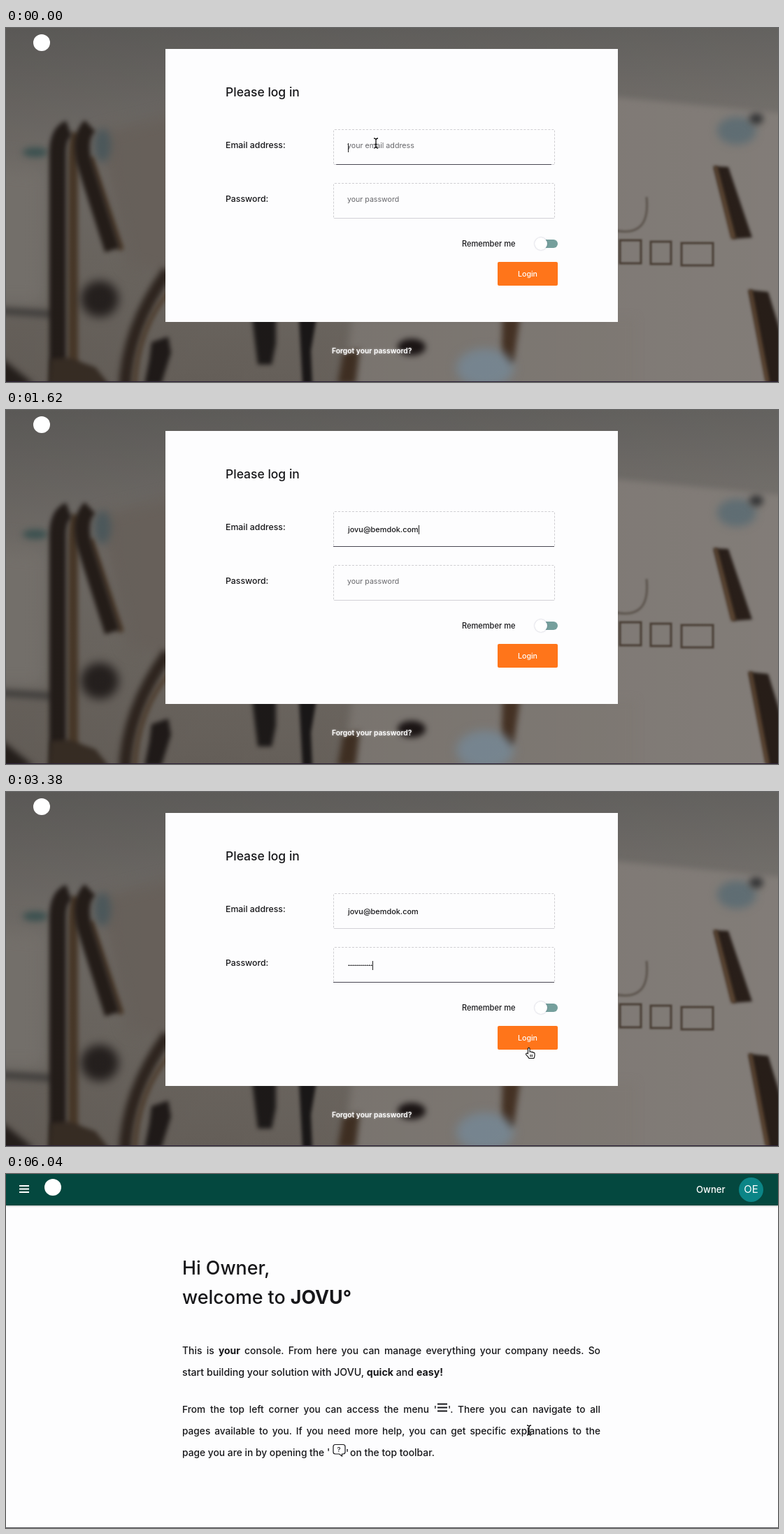
Write an HTML page with a canvas that moves like this. It is 1104x507 px and loops after 6060 ms.

```html
<!DOCTYPE html>
<html lang="en">
<head>
<meta charset="utf-8">
<title>Login</title>
<style>
html, body { margin: 0; width: 100%; height: 100%; overflow: hidden; background: #fdfdfe; }
body { position: relative; font-family: Inter, "Open Sans", sans-serif; font-weight: 500; color: #17171a; }
section, canvas { position: absolute; left: 0; top: 0; width: 1104px; height: 507px; overflow: hidden; }
p, .box { position: absolute; margin: 0; left: calc(var(--x) * 1px); top: calc(var(--y) * 1px); }
p { font-size: calc(var(--s) * 1px); line-height: 0; white-space: nowrap; }
.box { box-sizing: border-box; width: calc(var(--w) * 1px); height: calc(var(--h) * 1px); }
.white { color: #fff; }
.just { width: 598px; text-align: justify; text-align-last: justify; }
b { font-weight: 700; }
.card { background: #fdfdfe; }
.field { border: 1px dashed #cfced2; border-bottom: 1px solid #d2d1d6; border-radius: 2px; }
.line { background: #484652; }
.hint { color: #66666a; font-weight: 400; }
.value { display: flex; align-items: center; height: 0; }
.caret { width: 1px; height: 13px; background: #222; }
#dots { height: 2.92px; background: radial-gradient(circle, #17171a .75px, transparent 1.3px) 0 0 / 2.92px 2.92px; }
.knob { background: #fff; border-radius: 50%; box-shadow: 0 0 2px rgba(40,40,90,.35); }
.round { border-radius: 50%; background: #fff; }
svg { overflow: visible; }
p svg { display: inline-block; vertical-align: baseline; }
.cursor { position: absolute; left: 0; top: 0; width: 1px; height: 1px; }
</style>
</head>
<body>
<section id="login">
  <canvas id="photo" width="1104" height="507"></canvas>
  <div class="box round" style="--x:39;--y:9;--w:24;--h:24"></div>
  <div class="box card" style="--x:228;--y:30;--w:647;--h:391"></div>
  <p style="--x:314;--y:91.5;--s:17.5">Please log in</p>
  <p style="--x:314;--y:168;--s:12.3">Email address:</p>
  <p style="--x:314;--y:245;--s:12.3">Password:</p>
  <div class="box field" style="--x:468;--y:145;--w:317;--h:51"></div>
  <div class="box field" style="--x:468;--y:222;--w:317;--h:51"></div>
  <div class="box line" id="mailLine" style="--x:468;--y:195;--w:316;--h:1"></div>
  <div class="box line" id="passLine" style="--x:468;--y:272;--w:316;--h:1"></div>
  <p class="hint" id="mailHint" style="--x:488;--y:168.5;--s:10.7">your email address</p>
  <p class="hint" id="passHint" style="--x:488;--y:245.5;--s:10.6">your password</p>
  <p class="value" style="--x:489;--y:171;--s:10.9"><span id="mail"></span><i class="caret" id="mailCaret"></i></p>
  <p class="value" style="--x:489;--y:248;--s:10.9"><span id="dots"></span><i class="caret" id="passCaret"></i></p>
  <p style="--x:652;--y:309;--s:11.05">Remember me</p>
  <div class="box" style="--x:757;--y:302.5;--w:32;--h:12;background:#759f9c;border-radius:6px"></div>
  <div class="box knob" style="--x:756;--y:300;--w:18;--h:18"></div>
  <div class="box" style="--x:703;--y:335;--w:86;--h:34;background:#ff751a;border-radius:2px"></div>
  <p class="white" style="--x:732;--y:352.5;--s:10.6">Login</p>
  <p class="white" style="--x:466;--y:461.5;--s:10.3;font-weight:600;text-shadow:0 0 3px #fff8">Forgot your password?</p>
  <div class="box" style="--x:0;--y:506;--w:1104;--h:1;background:#2d2238"></div>
</section>

<section id="home">
  <div class="box" style="--x:0;--y:0;--w:1104;--h:45;background:#04483f;box-shadow:0 1px 2px rgba(0,0,0,.3)"></div>
  <svg class="cursor"><path d="M19 17H33M19 21.5H33M19 26H33" stroke="#fff" stroke-width="2"/></svg>
  <div class="box round" style="--x:55;--y:7;--w:24;--h:24"></div>
  <p class="white" style="--x:987;--y:21.5;--s:13.1">Owner</p>
  <div class="box" style="--x:1048;--y:4.5;--w:35;--h:35;background:#0b8587;border-radius:50%"></div>
  <p class="white" style="--x:1048;--y:22;--s:15;width:35px;text-align:center;font-weight:400">OE</p>
  <p style="--x:252;--y:134;--s:26.8">Hi Owner,</p>
  <p style="--x:252;--y:176;--s:26.8">welcome to <b>JOVU°</b></p>
  <p class="just" style="--x:252;--y:252.5;--s:13.9">This is <b>your</b> console. From here you can manage everything your company needs. So</p>
  <p style="--x:252;--y:284;--s:14.2">start building your solution with JOVU, <b>quick</b> and <b>easy!</b></p>
  <p class="just" style="--x:252;--y:337;--s:13.7">From the top left corner you can access the menu '<svg width="16" height="1"><path d="M1 -11.5H15M1 -6.5H15M1 -1.5H15" stroke="#17171a" stroke-width="2"/></svg>'. There you can navigate to all</p>
  <p class="just" style="--x:252;--y:368;--s:13.7">pages available to you. If you need more help, you can get specific explanations to the</p>
  <p style="--x:252;--y:398.5;--s:13.8">page you are in by opening the '</p>
  <svg class="cursor"><path d="M471 387.5H482Q485 387.5 485 390.5V398Q485 401 482 401H480.5V404L476.5 401H471Q468 401 468 398V390.5Q468 387.5 471 387.5Z" fill="none" stroke="#17171a" stroke-width="1.2"/></svg>
  <p style="--x:473.6;--y:394.5;--s:9.5">?</p>
  <p style="--x:486;--y:398.5;--s:13.7">'</p>
  <p style="--x:492;--y:398.5;--s:13.9">on the top toolbar.</p>
  <div class="box" style="--x:0;--y:506;--w:1104;--h:1;background:#59595d"></div>
</section>

<svg class="cursor" id="cursor" fill="#fff" stroke="#111" stroke-linejoin="round">
  <path id="beam" fill="none" stroke-width="1.3" d="M-3 -7Q0 -7 0 -4.5Q0 -7 3 -7M0 -5V5M-3 7Q0 7 0 4.5Q0 7 3 7M-1.5 1.5H1.5"/>
  <path id="arrow" d="M0 0V13L3 10.2L5 14.8L7 14L5 9.5H9Z"/>
  <path id="hand" stroke-width="1.1" d="M-1.6 7.5V1Q-1.6 -.6 -.3 -.6Q1 -.6 1 1V5.2Q2.8 4 3.7 5.7Q5.4 4.7 6.2 6.4Q8 5.7 8 8V10.5Q8 12.4 6.8 14.5H0Q-1.5 11.8 -4 9.6Q-5 8 -3.6 7.2Q-2.6 6.7 -1.6 8Z M2 9V12.5M4.3 9V12.5"/>
</svg>

<script>
const LOOP = 6060, MAIL = 'jovu@bemdok.com', DOTS = 12;
const MAIL_START = 250, MAIL_STEP = 85, TAB = 1800, PASS_START = 2020, PASS_STEP = 65;
const MOVE = 3050, MOVE_TIME = 270, SWITCH = 3600;
const $ = id => document.getElementById(id);
const clamp = v => Math.max(0, Math.min(1, v));
const easeOut = v => 1 - (1 - v) ** 2;
const show = (id, on) => { $(id).style.display = on ? '' : 'none'; };

// Blurred workshop backdrop
function paintPhoto() {
  const c = $('photo').getContext('2d');
  const fade = (x, y, ...colors) => {
    const g = c.createLinearGradient(0, 0, x, y);
    colors.forEach((color, i) => g.addColorStop(i / (colors.length - 1), color));
    c.fillStyle = g;
    c.fillRect(0, 0, 1104, 507);
  };
  const soft = (blur, color) => { c.filter = `blur(${blur}px)`; c.fillStyle = c.strokeStyle = color; };
  const poly = (blur, color, ...pts) => {
    soft(blur, color);
    c.beginPath();
    for (let i = 0; i < pts.length; i += 2) c.lineTo(pts[i], pts[i + 1]);
    c.fill();
  };
  const oval = (blur, color, x, y, rx, ry) => {
    soft(blur, color);
    c.beginPath();
    c.ellipse(x, y, rx, ry, 0, 0, 7);
    c.fill();
  };
  const curve = (blur, color, width, d) => {
    soft(blur, color);
    c.lineWidth = width;
    c.stroke(new Path2D(d));
  };

  fade(0, 507, '#6c6a67', '#827d78', '#7c766f', '#756e67');
  poly(14, '#8a857f', -30, 190, 60, 200, 60, 400, -30, 400);
  poly(10, '#79716a', 130, 150, 250, 120, 250, 360, 175, 340);
  poly(4, '#8d8782', 860, 98, 1130, 124, 1130, 530, 860, 530);
  poly(6, '#8b857f', 495, 415, 900, 415, 900, 530, 480, 530);
  curve(5, '#4b4846', 10, 'M-10 405L70 410');

  // Left frame
  oval(5, '#46605f', 42, 178, 18, 7);
  oval(6, '#59676b', 138, 168, 12, 24);
  curve(3, '#54412f', 14, 'M96 520V190Q96 165 100 150');
  curve(3, '#29211d', 24, 'M74 520V180Q74 150 90 144');
  curve(3, '#564230', 8, 'M121 185L165 318');
  curve(3, '#2a211c', 22, 'M120 140Q104 155 111 190L152 318');
  oval(7, '#2b2523', 134, 388, 27, 26);
  curve(4, '#352a23', 18, 'M170 520Q172 430 232 348');
  curve(3, '#59432f', 5, 'M184 520Q186 430 238 372');
  poly(5, '#2b2420', -10, 470, 40, 510, -10, 520);
  poly(3, '#40342a', 60, 520, 64, 474, 90, 472, 128, 486, 155, 520);
  poly(3, '#241e1c', 208, 450, 232, 442, 236, 465, 222, 510, 198, 510, 205, 475);

  // Pieces below the card
  poly(3, '#211d1c', 352, 415, 386, 415, 386, 452, 380, 482, 360, 482, 356, 450);
  poly(2.5, '#1d1a1a', 419, 415, 444, 415, 436, 462, 438, 510, 424, 510);
  poly(4, '#473527', 482, 465, 506, 460, 500, 510, 474, 510);
  poly(4, '#4c3728', 710, 415, 735, 415, 726, 478, 708, 488);
  oval(4, '#1e1717', 580, 457, 20, 12);
  oval(7, '#8595a1', 685, 487, 41, 28);

  // Board on the right
  oval(6, '#68777d', 1045, 147, 28, 20);
  oval(5, '#393a3b', 1073, 130, 10, 8);
  poly(2, '#2c211b', 1012, 198, 1033, 199, 1067, 300, 1039, 302);
  poly(2, '#624a35', 1012, 198, 1017, 198, 1044, 301, 1037, 302);
  poly(2, '#2a201a', 1062, 375, 1090, 378, 1112, 450, 1112, 520, 1088, 507);
  poly(2, '#614833', 1062, 375, 1067, 375, 1092, 507, 1086, 507);
  curve(1.5, '#655c54', 3, 'M872 290Q922 300 916 242');
  curve(1, '#51453b', 3, 'M878 304H908V337H878ZM922 306H951V338H922ZM966 308H1011V340H966Z');

  c.filter = 'none';
  fade(1104, 0, 'rgba(0,0,0,.17)', 'rgba(0,0,0,.08)');
}

function drawCursor(t) {
  const p = clamp((t - MOVE) / MOVE_TIME), k = p * p * (3 - 2 * p);
  const x = 529 + 219 * k, y = 165 + 202 * k;
  const inField = x < 785 && ((y > 145 && y < 196) || (y > 222 && y < 273));
  const kind = t >= SWITCH || inField ? 'beam' : x > 703 && y > 335 ? 'hand' : 'arrow';
  show('cursor', t < MAIL_START || t >= MOVE);
  for (const id of ['beam', 'arrow', 'hand']) show(id, id === kind);
  $('cursor').style.transform = `translate(${x}px, ${y}px)`;
}

function draw(t) {
  show('login', t < SWITCH);
  show('home', t >= SWITCH);
  const typed = (start, step, max) => Math.max(0, Math.min(max, Math.floor((t - start) / step) + 1));
  const fade = start => 1 - clamp((t - start) / 90);
  const grow = start => easeOut(clamp((t - start) / 240));
  $('mail').textContent = MAIL.slice(0, typed(MAIL_START, MAIL_STEP, MAIL.length));
  $('dots').style.width = typed(PASS_START, PASS_STEP, DOTS) * 2.92 + 'px';
  $('mailHint').style.opacity = fade(MAIL_START);
  $('passHint').style.opacity = fade(PASS_START);
  $('mailLine').style.transform = `scaleX(${grow(-200) - grow(TAB)})`;
  $('passLine').style.transform = `scaleX(${grow(TAB)})`;
  show('mailCaret', t < TAB);
  show('passCaret', t >= TAB);
  drawCursor(t);
}

paintPhoto();
const start = performance.now();
function tick() {
  draw((performance.now() - start) % LOOP);
  requestAnimationFrame(tick);
}
tick();
</script>
</body>
</html>
```
